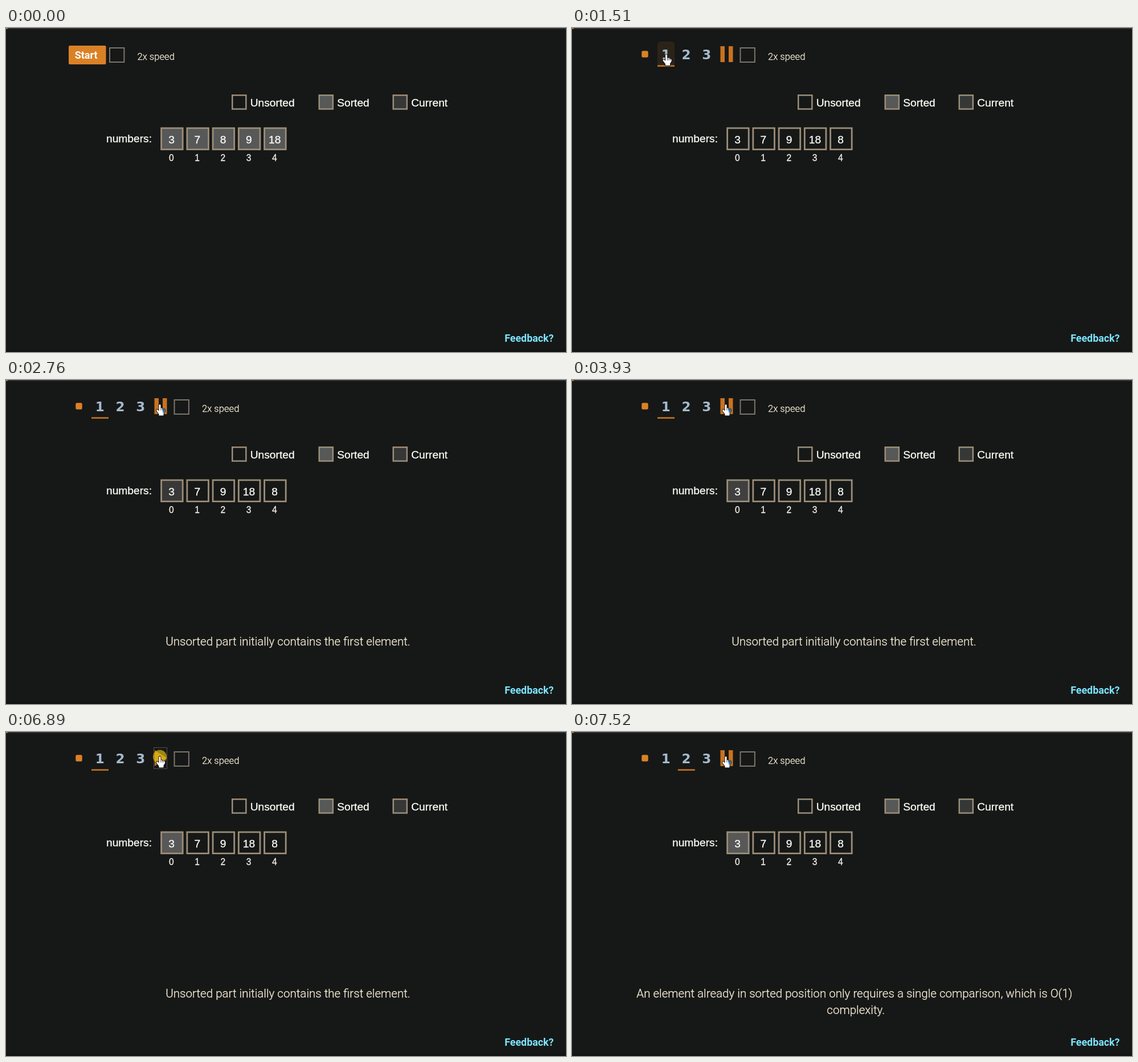
Write an HTML page with a canvas that moves like this. It is 983 px wide and 570 px high and loops after 8 s.

```html
<!DOCTYPE html>
<html lang="en">
<head>
<meta charset="utf-8">
<title>Insertion sort player</title>
<style>
  html, body { margin: 0; width: 100%; height: 100%; overflow: hidden; background: #161817; }
  canvas { display: block; }
</style>
</head>
<body>
<canvas id="stage" width="983" height="570"></canvas>
<script>
const ctx = document.getElementById('stage').getContext('2d');
const LOOP = 8000;
const SANS = '"Liberation Sans", Arial, sans-serif';
const ROBOTO = 'Roboto, sans-serif';
const BG = '#161817', WHITE = '#fffdf8', CREAM = '#f8ecd6';
const ORANGE = '#da8126', DEEP = '#c8721f', FRAME = '#9b8d79';
const SORTED = '#575858', CURRENT = '#363737';
const PLAYER_AT = 1140, RESET_AT = 1220, FIRST_NOTE = 1660;
const PAUSED_AT = 4700, RESUMED_AT = 7040, SECOND_NOTE = 7300;

const clamp = v => Math.max(0, Math.min(1, v));
const mix = (a, b, k) => a + (b - a) * k;
const smooth = k => k * k * (3 - 2 * k);
const step = (t, start, size) => start + Math.floor((t - start) / size) * size;

function rect(x, y, w, h, color, radius = 0) {
  ctx.fillStyle = color;
  ctx.beginPath();
  ctx.roundRect(x, y, w, h, radius);
  ctx.fill();
}

function box(x, y, w, h, line, fill, color = FRAME) {
  rect(x, y, w, h, color);
  rect(x + line, y + line, w - 2 * line, h - 2 * line, fill);
}

// Light and regular weights get a hairline stroke for a fuller tone.
function text(str, x, y, font, color, align = 'left') {
  ctx.font = font;
  ctx.fillStyle = ctx.strokeStyle = color;
  ctx.textAlign = align;
  ctx.fillText(str, x, y);
  if (font.startsWith('700')) return;
  ctx.lineWidth = 0.3;
  ctx.strokeText(str, x, y);
}

function shape(points, fill, stroke) {
  ctx.beginPath();
  points.forEach(([x, y]) => ctx.lineTo(x, y));
  ctx.closePath();
  if (stroke) {
    ctx.strokeStyle = stroke;
    ctx.lineWidth = 1.6;
    ctx.stroke();
  }
  ctx.fillStyle = fill;
  ctx.fill();
}

function arrow(x, y) {
  ctx.save();
  ctx.translate(x, y);
  shape([[0, 0], [0, 14], [3.3, 11], [5.7, 16.5], [8, 15.5], [5.7, 10.2], [10, 10]], '#fff', '#000');
  ctx.restore();
}

function hand(x, y, tint) {
  ctx.save();
  ctx.translate(x, y);
  ctx.beginPath();
  ctx.moveTo(-1.5, 1);
  ctx.quadraticCurveTo(0, -1, 1.5, 1);
  ctx.lineTo(1.5, 6);
  ctx.lineTo(8, 8);
  ctx.quadraticCurveTo(9.5, 8.5, 9, 12);
  ctx.lineTo(6.5, 16);
  ctx.lineTo(6.5, 19.5);
  ctx.lineTo(-1.5, 19.5);
  ctx.lineTo(-1.5, 17);
  ctx.lineTo(-6, 11);
  ctx.quadraticCurveTo(-6, 8, -3.5, 9.5);
  ctx.lineTo(-1.5, 11.5);
  ctx.closePath();
  ctx.lineWidth = 1.8;
  ctx.strokeStyle = '#0c0c0c';
  ctx.stroke();
  ctx.fillStyle = '#fff';
  ctx.fill();
  ctx.clip();
  if (tint === 'full') rect(-8, -2, 20, 17, '#3d92d6');
  if (tint === 'edge') rect(5, 6, 5, 8.5, '#2f7fd0');
  ctx.fillStyle = '#222';
  for (const fx of [1.5, 4, 6.5]) ctx.fillRect(fx, 6, 0.8, 4.5);
  ctx.restore();
}

function clickMark(x, y, alpha) {
  ctx.fillStyle = `rgba(228,196,12,${alpha})`;
  ctx.beginPath();
  ctx.arc(x, y, 12, 0, 7);
  ctx.fill();
}

function speedBox(shift) {
  box(181 + shift, 34, 27.4, 27, 2, BG, '#7e746a');
  text('2x speed', 230.5 + shift, 56, `300 16.64px ${ROBOTO}`, CREAM);
}

function startBar(t) {
  rect(110, 31, 65.5, 33, t >= 910 ? '#c66d1f' : ORANGE, 2);
  text('Start', 120.7, 54, `700 18px ${ROBOTO}`, '#fff');
  speedBox(0);
}

// Hover tint of a step button, fading after the pointer leaves.
function hover(t, from, until) {
  return t < from ? 0 : clamp(1 - (t - until) / 180);
}

function player(t) {
  rect(122.3, 40.3, 11.4, 11.4, ORANGE, 2.5);
  const tints = [hover(t, 1510, 1590), hover(t, 1660, 1790), 0];
  const active = t < 7200 ? 0 : 1;
  tints.forEach((tint, i) => {
    const x = 150 + 35.8 * i;
    if (tint) rect(x, 24, 30, 44, `rgba(218,129,38,${0.11 * tint})`, 5);
    if (i === active) rect(x, 65.4, 30, 2.6, DEEP);
    text(i + 1, x + 14.7, 54.5, '700 23px "DejaVu Sans", sans-serif', '#a3b9cc', 'center');
  });
  if (t >= PAUSED_AT && t < RESUMED_AT) {
    shape([[261, 32], [282.5, 46], [261, 60]], DEEP);
  } else {
    rect(260.5, 32, 7.5, 28, DEEP);
    rect(275, 32, 7.5, 28, DEEP);
  }
  speedBox(113.5);
}

function cellFill(t, i) {
  if (t < RESET_AT) return SORTED;
  if (i || t < 2760) return BG;
  const stage = [3930, 4080, 4240, 4470].filter(at => t >= at).length;
  const v = Math.round(mix(56, 88, stage / 4));
  return `rgb(${v},${v},${v})`;
}

function board(t) {
  const label = `19.2px ${SANS}`;
  [['Unsorted', 396, BG], ['Sorted', 548.5, SORTED], ['Current', 678.5, CURRENT]].forEach(([name, x, fill]) => {
    box(x, 117, 26.6, 26.8, 2.5, fill);
    text(name, x + 32.7, 138, label, WHITE);
  });
  text('numbers:', 176, 201, label, WHITE);
  const values = t < RESET_AT ? [3, 7, 8, 9, 18] : [3, 7, 9, 18, 8];
  values.forEach((value, i) => {
    const x = 271.2 + 45.25 * i;
    box(x, 174.8, 40.4, 40.2, 2.8, cellFill(t, i));
    text(value, x + 19.5, 203, label, WHITE, 'center');
    text(i, x + 19.1, 233.5, `15.6px ${SANS}`, '#f6f4ee', 'center');
  });
}

function note(t) {
  const font = `300 20.55px ${ROBOTO}`;
  if (t >= SECOND_NOTE) {
    text('An element already in sorted position only requires a single comparison, which is O(1)', 113.3, 467, font, CREAM);
    text('complexity.', 447.3, 496, font, CREAM);
  } else if (t >= FIRST_NOTE) {
    text('Unsorted part initially contains the first element.', 280.3, 467, font, CREAM);
  }
}

function pointer(t) {
  if (t < 70) return null;
  if (t < 910) {
    const k = smooth(clamp((step(t, 70, 76) - 70) / 760));
    const y = mix(552, 53, k) - 40 * Math.sin(Math.PI * k);
    return { x: mix(930, 167, k), y, kind: k < 0.02 ? 'hand' : 'arrow' };
  }
  if (t < 1510) return { x: 143.5, y: 48, kind: 'hand', tint: t < PLAYER_AT ? 'full' : '' };
  if (t < 1780) {
    const k = (step(t, 1510, 68) - 1442) / 340;
    return { x: mix(144, 252, k), y: mix(48, 41, k), kind: k < 0.5 ? 'hand' : 'arrow' };
  }
  if (t < 1840) return { x: 252, y: 41, kind: 'arrow' };
  const k = smooth(clamp((step(t, 1840, 80) - 1760) / 320));
  const playing = t < PAUSED_AT || t >= RESUMED_AT;
  return { x: mix(258, 270, k), y: mix(41, 43, k), kind: 'hand', tint: playing ? 'edge' : '' };
}

function draw(t) {
  rect(0, 0, 983, 570, BG);
  rect(0, 0, 983, 1.5, '#383a39');
  rect(0, 0, 3, 1.5, ORANGE);
  rect(0, 566, 983, 4, '#121413');

  if (t < PLAYER_AT) startBar(t);
  else player(t);
  board(t);
  note(t);

  const p = pointer(t);
  const onLink = p && p.x > 876 && p.y > 530;
  text('Feedback?', 875.2, 551.5, `700 17.85px ${ROBOTO}`, onLink ? '#5cbfe0' : '#7ce4ff');

  if (t >= 1060 && t < PLAYER_AT) clickMark(143, 48, 0.65);
  if (t >= 6890 && t < 7440) {
    ctx.strokeStyle = '#8d8d8d';
    ctx.lineWidth = 1;
    ctx.setLineDash([1, 1]);
    ctx.strokeRect(259.5, 27.5, 23, 37);
    ctx.setLineDash([]);
    const alpha = 0.65 * clamp(1 - (step(t, 6890, 70) - 6890) / 210);
    clickMark(270, 43.5, alpha);
  }
  if (!p) return;
  if (p.kind === 'hand') hand(p.x, p.y, p.tint);
  else arrow(p.x, p.y);
}

const begin = performance.now();
function tick() {
  draw((performance.now() - begin) % LOOP);
  requestAnimationFrame(tick);
}
tick();
</script>
</body>
</html>
```
